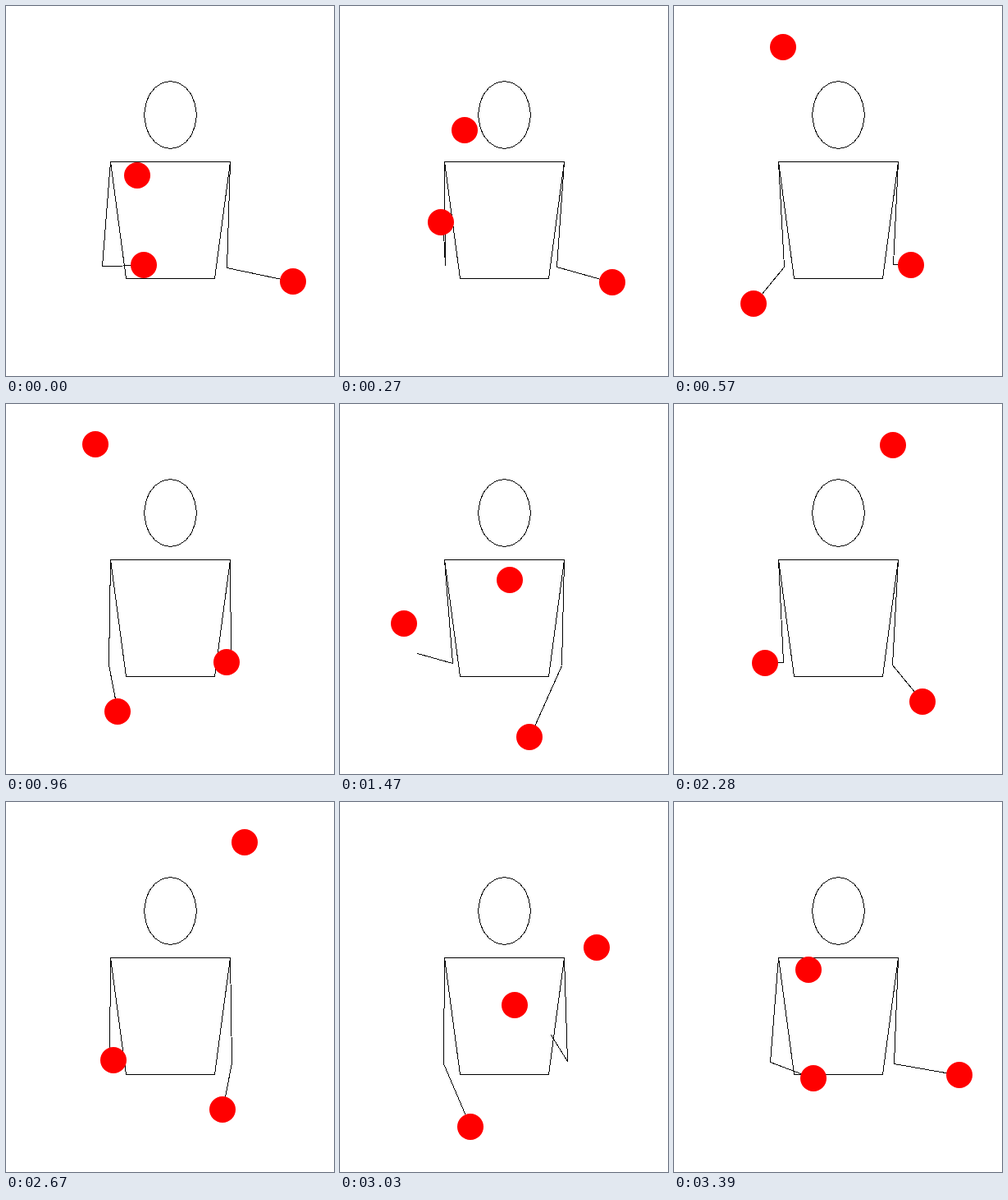
Animation of 400 by 450 pixels, one loop 3420 ms. Source, as an HTML page:

```html
<!DOCTYPE html>
<html lang="en">
<head>
<meta charset="utf-8">
<title>Juggler</title>
<style>
  html, body { margin: 0; width: 100%; height: 100%; overflow: hidden; background: #fff; }
  svg { display: block; }
  .lines { fill: none; stroke: #000; stroke-width: 1; shape-rendering: crispEdges; }
</style>
</head>
<body>
<svg width="400" height="450" viewBox="0 0 400 450">
  <g class="lines" transform="translate(.5 .5)">
    <polygon id="head"/>
    <polygon points="127,189 273,189 254,331 146,331"/>
    <polyline id="armL"/>
    <polyline id="armR"/>
  </g>
  <g fill="#f00">
    <circle class="ball" r="16"/>
    <circle class="ball" r="16"/>
    <circle class="ball" r="16"/>
  </g>
</svg>
<script>
// Siteswap 4-2-3. Time runs in 30 ms ticks; lengths of the body are in cm.
const TICK = 30, CYCLE = 114, HALF = CYCLE / 2, BEAT = 19;
const SCALE = 3.16, MID = 200, BASE = 315.45, GRAV = 0.4319;
const DWELL = 1.3 * BEAT, GAP = 2 * BEAT - DWELL;
const ARM = 41, REACH = 30, SHOULDER = { x: 127.3, y: 189 };

const side = cm => MID - cm * SCALE;
const mirror = p => ({ x: 2 * MID - p.x, y: p.y });
const mod = (a, b) => ((a % b) + b) % b;

// A throw leaves the left hand and lands in the left or right one.
function makeThrow(start, flight, from, to) {
  const vx = (to - from) / flight;
  return {
    start, flight, from,
    vel: { x: vx, y: -GRAV * flight },
    at: u => ({ x: from + vx * u, y: BASE - GRAV * u * (flight - u) })
  };
}
const high = makeThrow(0, 4 * BEAT - DWELL, side(10), side(40));
const low = makeThrow(2 * BEAT, 3 * BEAT - DWELL, side(12), 2 * MID - side(30));

// Cubic spline with fixed end slopes and smooth curvature between.
function spline(ts, ps, v0, v1) {
  const last = ts.length - 1, v = ts.map(() => 0);
  v[0] = v0;
  v[last] = v1;
  for (let pass = 0; pass < 60; pass++) {
    for (let i = 1; i < last; i++) {
      const a = 1 / (ts[i] - ts[i - 1]), b = 1 / (ts[i + 1] - ts[i]);
      const pull = 3 * ((ps[i] - ps[i - 1]) * a * a + (ps[i + 1] - ps[i]) * b * b);
      v[i] = (pull - a * v[i - 1] - b * v[i + 1]) / (2 * (a + b));
    }
  }
  return t => {
    let i = 0;
    while (i < last - 1 && t >= ts[i + 1]) i++;
    const h = ts[i + 1] - ts[i], s = (t - ts[i]) / h, r = 1 - s;
    return ps[i] + (ps[i + 1] - ps[i]) * s * s * (3 - 2 * s)
      + h * s * r * (r * v[i] - s * v[i + 1]);
  };
}

function handPath(ts, xs, a, b) {
  const fx = spline(ts, xs, a.x, b.x);
  const fy = spline(ts, ts.map(() => BASE), a.y, b.y);
  return t => ({ x: fx(t), y: fy(t) });
}

const lowCatch = GAP, highCatch = 2 * BEAT + GAP;
const shortCarry = handPath([0, lowCatch, low.start],
  [high.from, side(30), low.from], high.vel, low.vel);

// The held ball passes two evenly spaced points on its way to the throw.
const holdTimes = [highCatch, 4 * BEAT, 4 * BEAT + GAP, CYCLE];
const drift = (high.from - side(40)) / (CYCLE - highCatch);
const longCarry = handPath([low.start, ...holdTimes],
  [low.from, ...holdTimes.map(t => side(40) + drift * (t - highCatch))], low.vel, high.vel);

const hand = n => n < low.start ? shortCarry(n) : longCarry(n);
const holding = n => (n >= lowCatch && n < low.start) || n >= highCatch;

function ballsOf(n) {
  const list = holding(n) ? [hand(n)] : [];
  for (const toss of [high, low]) {
    const u = mod(n - toss.start, CYCLE);
    if (u < toss.flight) list.push(toss.at(u));
  }
  return list;
}

// The elbow hangs below the line from shoulder to hand.
function elbow(h) {
  const dx = (h.x - SHOULDER.x) / SCALE, dy = (h.y - SHOULDER.y) / SCALE;
  const d = Math.hypot(dx, dy, REACH), flat = Math.hypot(dx, REACH);
  const drop = Math.sqrt(Math.max(0, ARM * ARM - d * d / 4));
  return {
    x: SHOULDER.x + SCALE * dx * (0.5 - drop * dy / (flat * d)),
    y: SHOULDER.y + SCALE * (dy / 2 + drop * flat / d)
  };
}

const points = list => list.map(p => Math.round(p.x) + "," + Math.round(p.y)).join(" ");
const armPoints = n => {
  const h = hand(n);
  return [SHOULDER, elbow(h), h];
};

const armL = document.getElementById("armL");
const armR = document.getElementById("armR");
const circles = document.querySelectorAll(".ball");

document.getElementById("head").setAttribute("points", points(
  Array.from({ length: 20 }, (_, i) => {
    const a = i * Math.PI / 10;
    return { x: 200 + 32 * Math.cos(a), y: 132 + 41 * Math.sin(a) };
  })));

function draw(ms) {
  const n = Math.floor(ms / TICK) % CYCLE, m = (n + HALF) % CYCLE;
  armL.setAttribute("points", points(armPoints(n)));
  armR.setAttribute("points", points(armPoints(m).map(mirror)));
  const balls = ballsOf(n).concat(ballsOf(m).map(mirror));
  circles.forEach((c, i) => {
    c.setAttribute("cx", Math.round(balls[i].x));
    c.setAttribute("cy", Math.round(balls[i].y));
  });
}

let origin = null;
function frame(now) {
  if (origin === null) origin = now;
  draw(Math.max(0, now - origin));
  requestAnimationFrame(frame);
}
draw(0);
requestAnimationFrame(frame);
</script>
</body>
</html>
```
